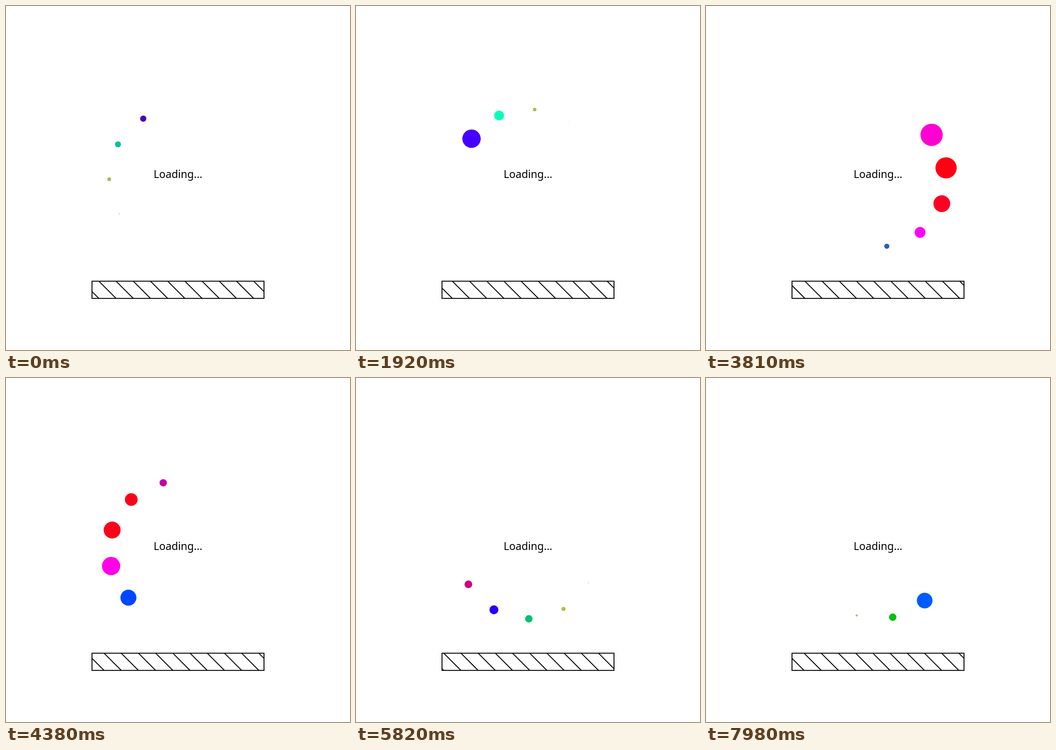
An HTML page that plays this animation: 748x748 px, repeating every 8000 ms.

```html
<!DOCTYPE html>
<html lang="en">
<head>
<meta charset="utf-8">
<title>Loading</title>
<style>
  html, body { margin: 0; width: 100%; height: 100%; overflow: hidden; background: #fff; }
  svg { display: block; width: 100vw; height: 100vh; }
  text { font: 23.05px "Noto Sans", "Open Sans", sans-serif; text-anchor: middle; }
</style>
</head>
<body>
<svg viewBox="0 0 748 748">
  <defs>
    <clipPath id="bar"><rect x="187" y="598.4" width="374" height="37.4"/></clipPath>
  </defs>
  <g id="dots"></g>
  <text x="374" y="374">Loading...</text>
  <g fill="none" stroke="#000" stroke-width="2">
    <g clip-path="url(#bar)"><path id="stripes"/></g>
    <rect x="187" y="598.4" width="374" height="37.4"/>
  </g>
</svg>
<script>
const SIZE = 748, MID = SIZE / 2, ORBIT = SIZE / 5, GAP = SIZE / 20;
const LOOP = 8000, STEP = 30, LAG = 0.53;
const stripes = document.getElementById('stripes');
const group = document.getElementById('dots');

const dots = Array.from({ length: 5 }, () =>
  group.appendChild(document.createElementNS('http://www.w3.org/2000/svg', 'circle')));

const clamp = (v, lo, hi) => Math.min(hi, Math.max(lo, v));

function hsv(h, s, v) {
  const channel = n => {
    const k = (n + h * 6) % 6;
    return Math.round(255 * v * (1 - s * clamp(Math.min(k, 4 - k), 0, 1)));
  };
  return `rgb(${channel(5)},${channel(3)},${channel(1)})`;
}

function draw(ms) {
  const n = Math.floor((ms % LOOP) / STEP);

  dots.forEach((dot, i) => {
    const angle = 2.063 - 0.17 * n + LAG * i;
    const swell = (1 - Math.cos(LAG * i - 0.09 - 0.03 * n)) / 2;
    const r = swell * (6 - i) * SIZE / 160;
    dot.setAttribute('cx', MID + ORBIT * Math.cos(angle));
    dot.setAttribute('cy', MID + ORBIT * Math.sin(angle));
    dot.setAttribute('r', r);
    // small dots are duller
    dot.setAttribute('fill', hsv(swell, clamp(r / 7, 0, 1), clamp(0.75 + (r - 8) / 8, 0.75, 1)));
  });

  const shift = ((n + 8) % 20) * GAP / 20;
  let d = '';
  for (let k = -1; k < 10; k++) {
    d += `M${MID / 2 + shift + k * GAP - 1} 597.4l${GAP + 2} ${GAP + 2}`;
  }
  stripes.setAttribute('d', d);
}

const start = performance.now();
function tick() {
  draw(performance.now() - start);
  requestAnimationFrame(tick);
}
tick();
</script>
</body>
</html>
```
